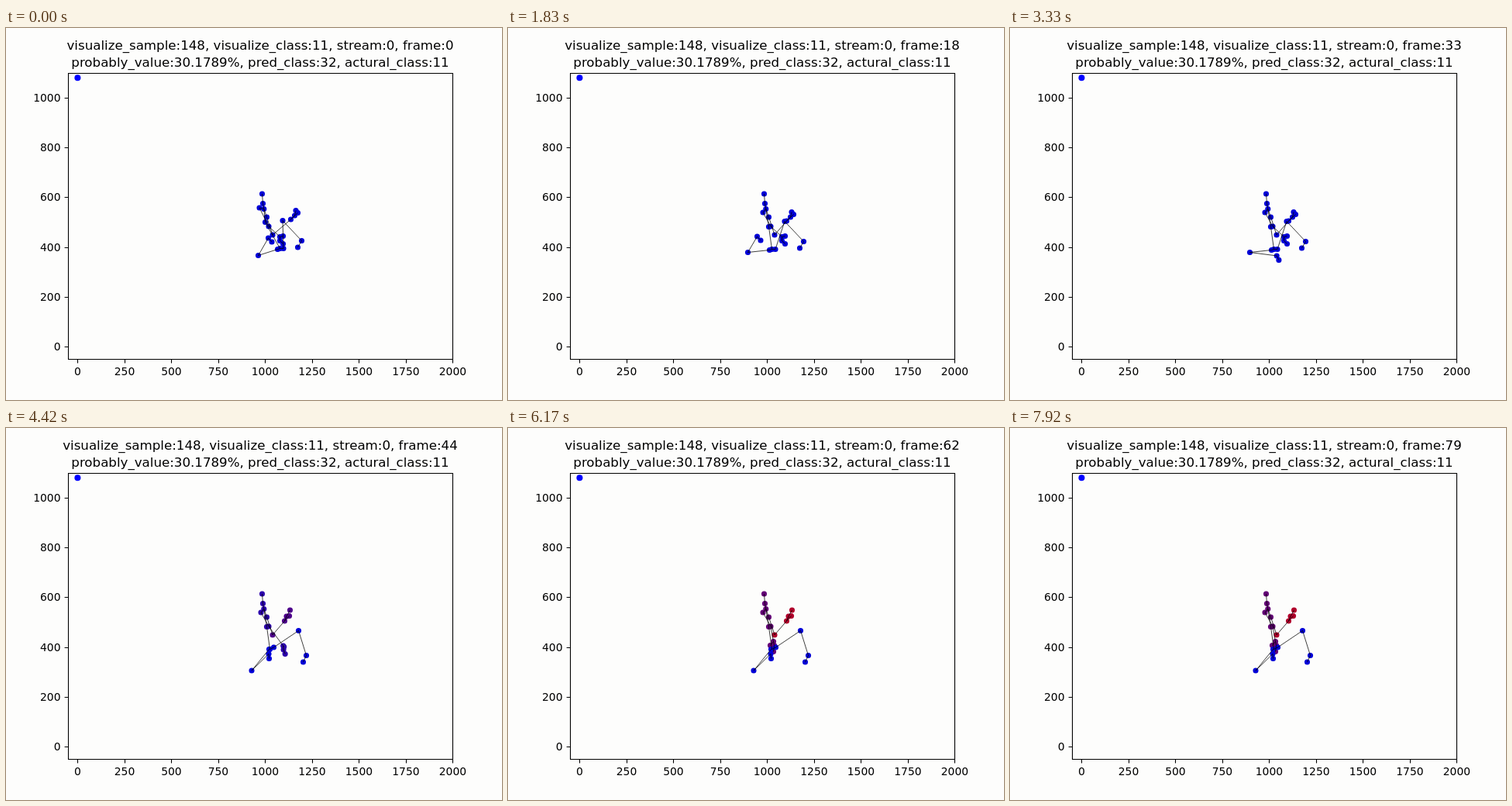
An HTML page for the animation above (8000 ms loop, 640x480 px).

```html
<!DOCTYPE html>
<html lang="en">
<head>
<meta charset="utf-8">
<title>Skeleton plot</title>
<style>
html, body { margin: 0; width: 100%; height: 100%; overflow: hidden; background: #fdfdfc; }
svg { display: block; width: 100vw; height: 100vh; }
text { font-family: "DejaVu Sans", sans-serif; font-size: 13.89px; }
.title { font-size: 16.67px; text-anchor: middle; }
.line { fill: none; stroke: #000; stroke-width: 1.1; }
.bones { stroke-width: 0.75; }
</style>
</head>
<body>
<svg id="stage" viewBox="0 0 640 480"></svg>
<script>
const stage = document.getElementById('stage');

function add(tag, attrs, text = '', into = stage) {
  const el = document.createElementNS('http://www.w3.org/2000/svg', tag);
  for (const k in attrs) el.setAttribute(k, attrs[k]);
  el.textContent = text;
  return into.appendChild(el);
}

// Axes
const px = v => 92.1 + v * 0.24195;
const py = v => 411.1 - v * 0.3214;
let frame = 'M80.5 58.5H576.5V427.5H80.5Z';
for (let v = 0; v <= 2000; v += 250) {
  frame += `M${Math.round(px(v)) + 0.5} 427.5v4.9`;
  add('text', { x: px(v) + 0.4, y: 448, 'text-anchor': 'middle' }, v);
}
for (let v = 0; v <= 1000; v += 200) {
  const y = Math.round(py(v));
  frame += `M80.5 ${y + 0.5}h-4.9`;
  add('text', { x: 70.5, y: y + 5, 'text-anchor': 'end' }, v);
}
const title = add('text', { x: 328, y: 28, class: 'title' });
add('text', { x: 328, y: 50, class: 'title' },
  'probably_value:30.1789%, pred_class:32, actural_class:11');
add('circle', { cx: px(0) + 0.3, cy: py(1080) + 0.3, r: 4, fill: '#00f' });
const body = add('g', { transform: 'translate(.5 .5)' });

// start: offset that fades out while settling; span: when the part changes pose;
// arc: sideways swing during the change; heat: how red it ends up
function part(start, span = [33, 44], arc = [0, 0], heat = 0) {
  return { start, span, arc, heat };
}
const still = [0, 0];
const torso = part(still, [33, 44], still, 0.45);
const trunk = part([-2, -6], [33, 44], still, 0.45);
const armA = part(still, [33, 62], [9, 10], 0.45);
const armB = part(still, [33, 44], still, 0.8);
const fistB = part([8, -2], [33, 44], still, 0.8);
const hips = part([13, -1]);
const legA = part([16, 4]);
const footA = part([17, 2], [24, 44], [15, 15]);
const legB = part([0, -1]);

const joints = [];
function joint(parent, part, from, to = from) {
  const j = { parent, part, from, to, dot: add('circle', { r: 3.55 }, '', body) };
  joints.push(j);
  return j;
}

const chest = joint(null, torso, [332.3, 233]);
const neck = joint(chest, torso, [331, 226]);
joint(neck, torso, [330, 213.5]);
const mid = joint(chest, trunk, [336, 256]);
const base = joint(mid, hips, [340, 285]);

const shoulderA = joint(chest, trunk, [328.5, 237.5]);
const elbowA = joint(shoulderA, torso, [338.5, 255.5]);
const wristA = joint(elbowA, armA, [353, 269], [342, 275]);
const handA = joint(wristA, armA, [353, 274], [343, 280]);
joint(handA, armA, [357, 278], [342, 288]);
joint(wristA, armA, [357, 268], [338, 280]);

const shoulderB = joint(chest, torso, [336, 243.5]);
const elbowB = joint(shoulderB, armB, [343.5, 266.5]);
const wristB = joint(elbowB, fistB, [359, 248.5]);
const handB = joint(wristB, fistB, [364, 243.5], [361.5, 242.5]);
joint(handB, fistB, [365.5, 237], [366, 234.5]);
joint(wristB, fistB, [368, 240], [365, 242]);

const hipA = joint(base, hips, [337, 286], [339, 285]);
const kneeA = joint(hipA, legA, [309, 289], [316.5, 312.5]);
const ankleA = joint(kneeA, footA, [321, 268.5], [338.5, 291]);
joint(ankleA, footA, [325.5, 273.5], [339, 297]);

const hipB = joint(base, hips, [344.5, 285], [345, 282.5]);
const kneeB = joint(hipB, legB, [356.5, 249], [377, 261]);
const ankleB = joint(kneeB, legB, [381, 275], [387, 293]);
joint(ankleB, legB, [376, 283.5], [383, 301.5]);

const bones = add('path', { class: 'line bones' }, '', body);
add('path', { class: 'line', d: frame });

const progress = (f, a, b) => Math.min(1, Math.max(0, (f - a) / (b - a)));

function place({ part, from, to }, f) {
  const settle = 1 - progress(f, 0, 12);
  const u = progress(f, ...part.span);
  const swing = Math.sin(Math.PI * u);
  return from.map((v, i) =>
    v + (to[i] - v) * u + part.start[i] * settle + part.arc[i] * swing);
}

// Five uneven steps per half second
const beats = [0, 80, 170, 330, 420];

function render(ms) {
  const t = ms % 8000;
  const f = 5 * Math.floor(t / 500) + beats.filter(b => b <= t % 500).length - 1;
  title.textContent = `visualize_sample:148, visualize_class:11, stream:0, frame:${f}`;
  let d = '';
  for (const j of joints) {
    [j.x, j.y] = place(j, f);
    const red = j.part.heat * progress(f, 33, 58);
    j.dot.setAttribute('cx', j.x);
    j.dot.setAttribute('cy', j.y);
    j.dot.setAttribute('fill', `rgb(${Math.round(220 * red)},0,${Math.round(215 * (1 - red))})`);
    if (j.parent) d += `M${j.parent.x} ${j.parent.y}L${j.x} ${j.y}`;
  }
  bones.setAttribute('d', d);
}

const start = performance.now();
function tick() {
  render(performance.now() - start);
  requestAnimationFrame(tick);
}
tick();
</script>
</body>
</html>
```
